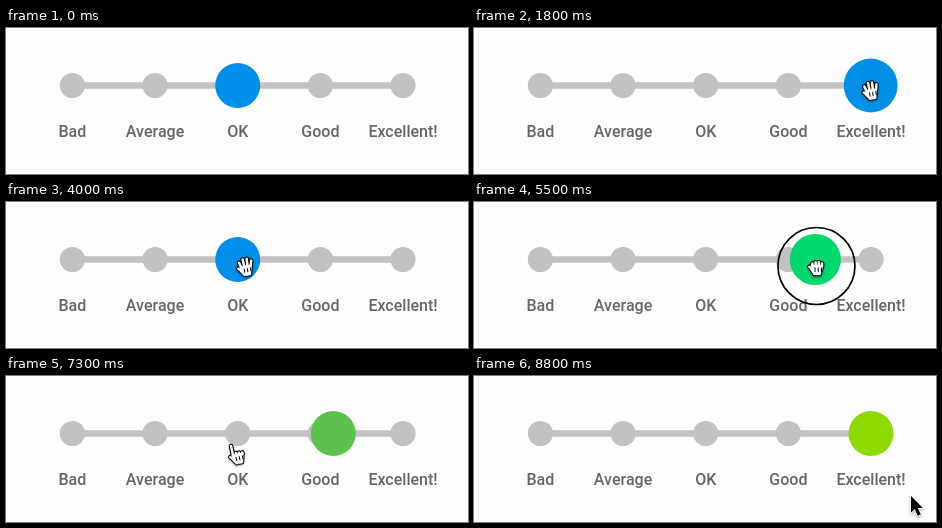
An HTML page for the animation above (8.9 s loop, 462 by 146 pixels).

```html
<!DOCTYPE html>
<html lang="en">
<head>
<meta charset="utf-8">
<title>Rating slider</title>
<style>
  html, body { margin: 0; width: 100%; height: 100%; overflow: hidden; background: #fdfdfd; }
  svg { display: block; width: 462px; height: 146px; }
  text { font: 500 16px Roboto, Arial, sans-serif; fill: #666; text-anchor: middle; }
  #cursor { filter: drop-shadow(0 1px 1px rgba(0, 0, 0, .35)); }
  .edge, .skin, .crease { stroke-linecap: round; stroke-linejoin: round; }
  .edge { fill: #000; stroke: #000; }
  .skin { fill: #fff; stroke: #fff; }
  .crease { fill: none; stroke: #000; }
</style>
</head>
<body>
<svg viewBox="0 0 462 146">
  <path d="M66.4 57.5H397" stroke="#c2c2c2" stroke-width="6.5"/>
  <g id="stops" fill="#c2c2c2"></g>
  <circle id="knob" cy="57.5"/>
  <circle id="ring" r="38.5" fill="none" stroke="#000" stroke-width="1.7"/>
  <g id="cursor">
    <path id="arrow" d="M0 0V16.6L3.8 13L6.7 19.8L9.8 18.5L6.9 11.9H12Z" stroke="#fff" stroke-width="1.6" paint-order="stroke"/>
    <g id="point" transform="translate(6 11) rotate(-12)"></g>
    <g id="open" transform="translate(1 .5) rotate(-10)"></g>
    <g id="fist"></g>
  </g>
</svg>
<script>
const LOOP = 8900, STEP = 100, SNAP = 400, TRAVEL = 550, PAUSE = 100;
const REST = 22.5, HELD = 27, TRACK_Y = 57.5;
const STOPS = [
  { label: 'Bad', color: [232, 62, 0] },
  { label: 'Average', color: [245, 160, 0] },
  { label: 'OK', color: [0, 143, 232] },
  { label: 'Good', color: [0, 215, 110] },
  { label: 'Excellent!', color: [140, 218, 0] }
];
STOPS.forEach((stop, i) => stop.x = 66.4 + 82.65 * i);

// A press at x; with `end` it is a drag, with `pull` it first swings backwards.
const ACTIONS = [
  { down: 690, up: 1765, x: 230.5, y: 62, end: 395.5, pull: 4, to: 4 },
  { down: 2480, up: 2620, x: 68, y: 61, to: 0 },
  { down: 3270, up: 3420, x: 233, y: 63, to: 2 },
  { down: 4400, up: 4750, x: 245, y: 65, end: 284, to: 3 },
  { down: 5250, up: 5650, x: 315.5, y: 64, end: 352, to: 4 },
  { down: 7121, up: 7280, x: 225, y: 68, to: 2 },
  { down: 7690, up: 8200, x: 227, y: 62, end: 388, to: 4 }
];
const ROUTE = [{ down: 0, up: 200, x: 222, y: 113 }, ...ACTIONS, { down: LOOP, up: LOOP, x: 437, y: 120 }];

const $ = id => document.getElementById(id);
const clamp = (v, lo, hi) => Math.min(hi, Math.max(lo, v));
const mix = (a, b, k) => a + (b - a) * k;
// pull -3 is smoothstep; positive values undershoot before moving on.
const ease = (p, pull = -3) => { p = clamp(p, 0, 1); return p * p * ((pull + 1) * p - pull); };

function pressX({ x, end = x, down, up, pull }, t) {
  return mix(x, end, ease((t - down) / (up - down) / .94, pull));
}

function pointerAt(t) {
  const i = ROUTE.findLastIndex(stop => t >= stop.down);
  const here = ROUTE[i], next = ROUTE[i + 1];
  const x = pressX(here, t);
  if (!next || t <= here.up) return [x, here.y];
  const arrive = next.down - PAUSE, leave = Math.max(here.up, arrive - TRAVEL);
  const k = ease((t - leave) / (arrive - leave));
  const sag = Math.abs(next.x - x) * .03 * Math.sin(Math.PI * k);
  return [mix(x, next.x, k), mix(here.y, next.y, k) + sag];
}

function sliderAt(t) {
  let { x, color } = STOPS[2], r = REST, pressed = false, dragging = false;
  for (const action of ACTIONS) {
    const { down, up, to, end } = action;
    if (t < down) break;
    const held = Math.min(t, up);
    pressed = t < up;
    dragging = pressed && !!end;
    if (end) {
      x = clamp(x + pressX(action, held) - action.x, STOPS[0].x, STOPS[4].x);
      r = mix(REST, HELD, ease((held - down) / SNAP));
    }
    const k = ease((t - (end ? up : down)) / SNAP);
    x = mix(x, STOPS[to].x, k);
    r = mix(r, REST, k);
    color = color.map((c, i) => mix(c, STOPS[to].color[i], k ** 1.25));
  }
  return { x, r, color, pressed, dragging };
}

function drawHand(id, reach, fan) {
  const palm = 'M-5 -1H6.4L5.6 4L4 9H-2.6L-5.6 4.4Z';
  let fingers = 'M-4 4L-7 .8', creases = '';
  for (let i = 0; i < 4; i++) {
    const x = -4 + 3.2 * i;
    fingers += `M${x} 0L${x + (i - 1.5) * fan} ${-reach(i)}`;
    if (i) creases += `M${x - .6} 2v3.5`;
  }
  const layer = (name, width, d) => `<path class="${name}" stroke-width="${width}" d="${d}"/>`;
  $(id).innerHTML = layer('edge', 4.6, fingers) + layer('edge', 2.4, palm) +
    layer('skin', 2.5, fingers) + layer('skin', .4, palm) + layer('crease', 1, creases);
}
const arch = i => Math.sin(Math.PI * i / 3);
drawHand('open', i => 5 + 3 * arch(i), .9);
drawHand('fist', i => 2.5 + 1.4 * arch(i), 0);
drawHand('point', i => i ? 2.6 - .4 * i : 10, 0);

$('stops').innerHTML = STOPS.map(({ x, label }) =>
  `<circle cx="${x}" cy="${TRACK_Y}" r="12.6"/><text x="${x}" y="109">${label}</text>`).join('');

function cursorKind(px, py, slider) {
  const within = (x, r) => Math.hypot(px - x, py - TRACK_Y) < r;
  if (slider.dragging) return 'fist';
  if (within(slider.x, slider.r)) return 'open';
  return STOPS.some(stop => within(stop.x, 13)) ? 'point' : 'arrow';
}

function show(id, visible) { $(id).style.display = visible ? '' : 'none'; }
function set(id, attributes) {
  for (const name in attributes) $(id).setAttribute(name, attributes[name]);
}

function render(t) {
  const slider = sliderAt(t), [px, py] = pointerAt(t);
  const kind = cursorKind(px, py, slider);
  set('knob', { cx: slider.x, r: slider.r, fill: `rgb(${slider.color.map(Math.round)})` });
  set('ring', { cx: px, cy: py });
  set('cursor', { transform: `translate(${px} ${py})` });
  show('ring', slider.pressed);
  show('cursor', t >= STEP);
  for (const id of ['arrow', 'point', 'open', 'fist']) show(id, id === kind);
}

const start = performance.now();
function tick() {
  const t = (performance.now() - start) % LOOP;
  render(Math.floor(t / STEP) * STEP);
  requestAnimationFrame(tick);
}
tick();
</script>
</body>
</html>
```
